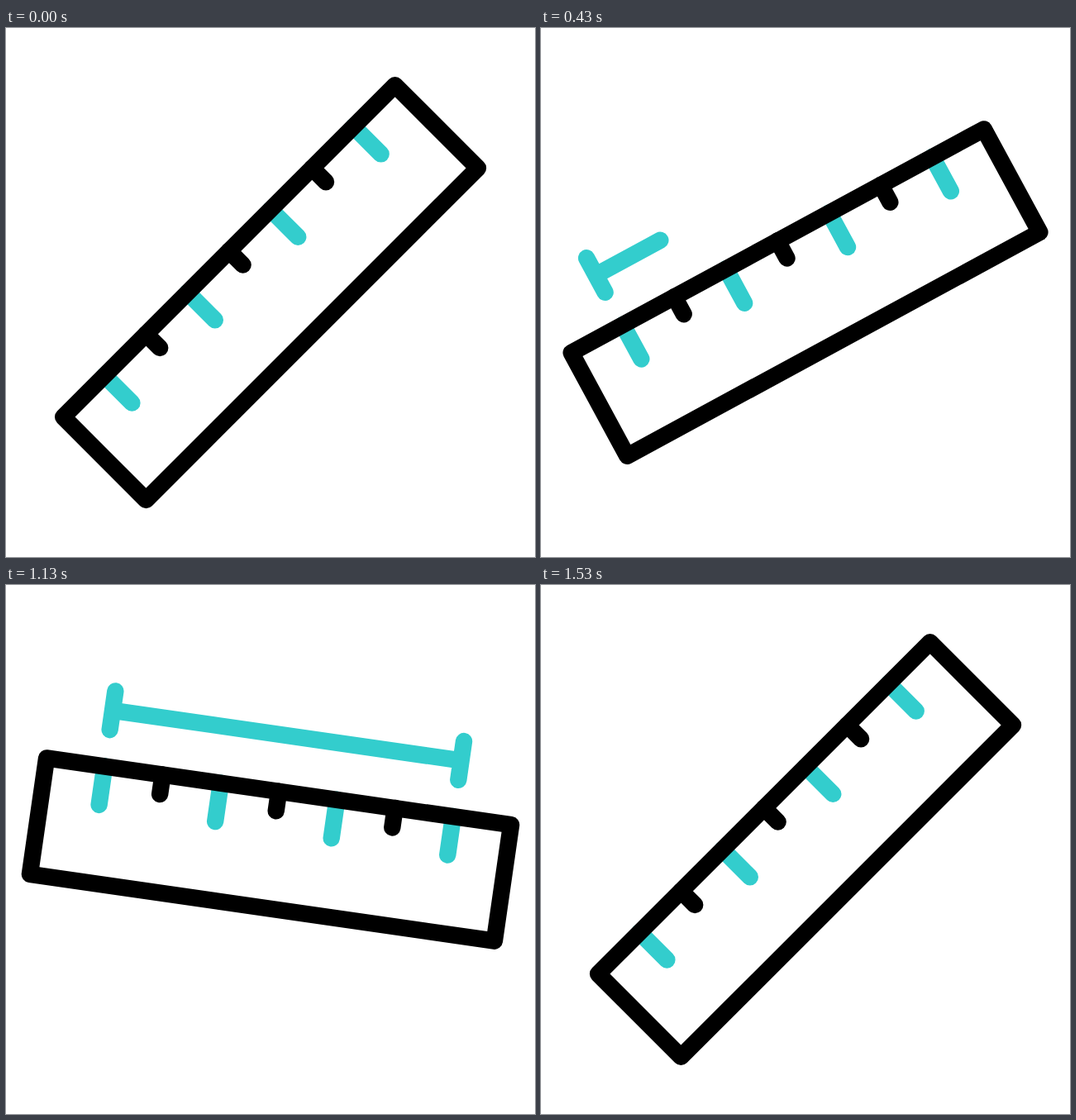
Recreate the animation shown at these times as an HTML page. Size 640 by 640 pixels, loop 1.67 s.

```html
<!DOCTYPE html>
<html lang="en">
<head>
<meta charset="utf-8">
<title>Ruler</title>
<style>
  html, body { margin: 0; height: 100%; overflow: hidden; background: #fff; }
  svg { display: block; width: 100vw; height: 100vh; }
  .ink, .teal { fill: none; stroke-width: 20.4; stroke-linecap: round; stroke-linejoin: round; }
  .ink { stroke: #000; }
  .teal { stroke: #33cdcd; }
</style>
</head>
<body>
<svg viewBox="0 0 640 640">
  <g id="ruler">
    <path class="teal" d="M107 249V296M249 249V296M391 249V296M533 249V296"/>
    <path class="ink" d="M178 249V272.8M320 249V272.8M462 249V272.8"/>
    <rect class="ink" x="36.1" y="249.1" width="567.8" height="141.9"/>
    <path class="teal" id="span"/>
  </g>
</svg>
<script>
  const LOOP = 1670, FPS = 30;
  const CAP = 47.2, WIDTH = 426, TOTAL = CAP * 2 + WIDTH;
  const ruler = document.getElementById('ruler');
  const span = document.getElementById('span');

  // Eased 0..1 between two ticks
  const ease = (t, from, to) => {
    const u = Math.min(1, Math.max(0, (t - from) / (to - from)));
    return u * u * (3 - 2 * u);
  };

  // Each turn swings back a little before going on
  const angle = t => -45
    - 13.5 * ease(t, 0, 8.75) + 58.5 * ease(t, 8.75, 17.1)
    + 12.3 * ease(t, 27.93, 37.85) - 57.3 * ease(t, 37.85, 46.1);

  const drawn = t => TOTAL * (ease(t, 8.07, 22.8) - ease(t, 34.9, 45.9));

  // Left cap, long line and right cap are drawn one after another
  function spanPath(len) {
    if (len < 0.01) return '';
    let d = `M107 204.3v${-Math.min(len, CAP)}`;
    if (len > CAP) d += `M107 180.7h${Math.min(len - CAP, WIDTH)}`;
    if (len > CAP + WIDTH) d += `M533 204.3v${CAP + WIDTH - len}`;
    return d;
  }

  function render(now) {
    // Motion runs in 30 fps ticks; the offset absorbs rounding to 10 ms
    const t = Math.floor(((now % LOOP) + 4) * FPS / 1000);
    ruler.setAttribute('transform', `rotate(${angle(t).toFixed(3)} 320 320)`);
    span.setAttribute('d', spanPath(drawn(t)));
  }

  const start = performance.now();
  function loop() {
    render(performance.now() - start);
    requestAnimationFrame(loop);
  }
  loop();
</script>
</body>
</html>
```
